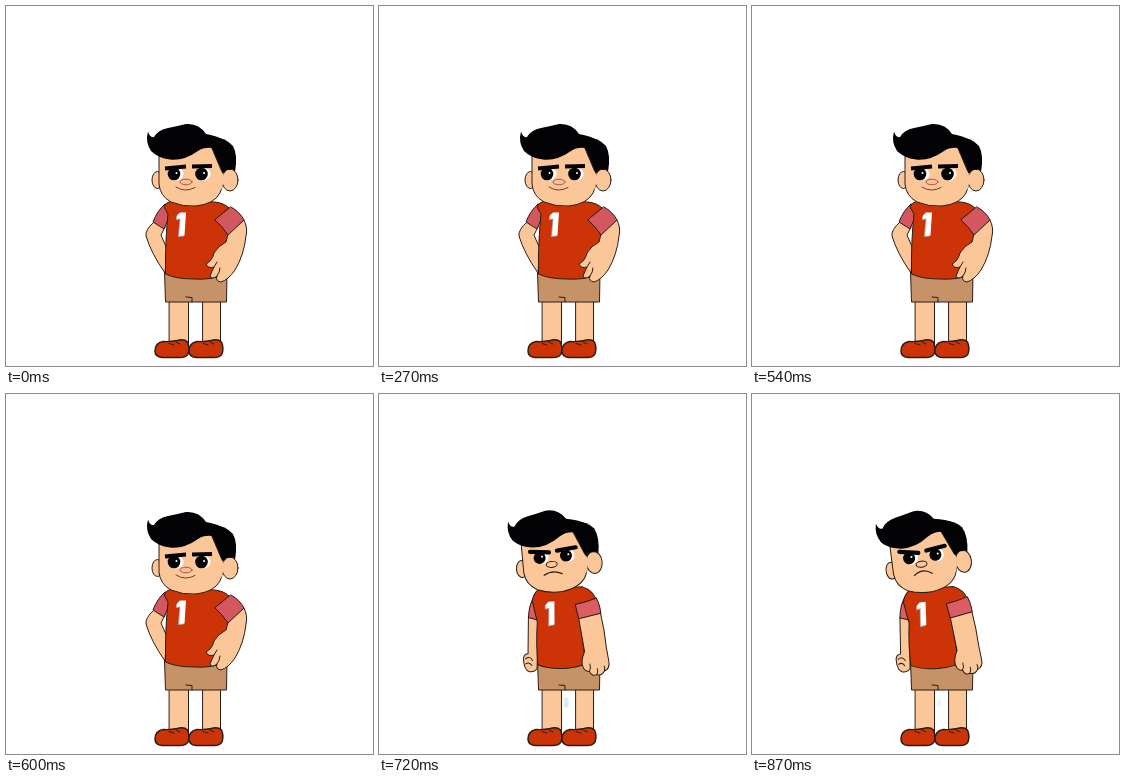
Write an HTML page that moves like this. It is 367 px wide and 360 px high and loops after 900 ms.

```html
<!DOCTYPE html>
<html lang="en">
<head>
<meta charset="utf-8">
<title>Boy turning grumpy</title>
<style>
  @property --p { syntax: "<number>"; inherits: true; initial-value: 0; }
  @property --lift { syntax: "<length>"; inherits: true; initial-value: 0px; }
  html, body { margin: 0; width: 100%; height: 100%; overflow: hidden; background: #fff; }
  svg { display: block; width: 100vw; height: 100vh; animation: lean 900ms step-end infinite; }

  .line { fill: none; }
  g { stroke-linejoin: round; stroke-linecap: round; }
  .ink { stroke: #2a1c17; stroke-width: 1; }
  .skin { fill: #fbc798; }
  .red { fill: #cc3407; }
  .cuff { fill: #d2575f; }
  .cross .cuff { fill: #da5d64; }
  .black { fill: #030305; stroke: none; }
  .white { fill: #fff; stroke: none; }

  .calm { animation: calm 900ms step-end infinite; }
  .cross { visibility: hidden; animation: cross 900ms step-end infinite; }

  .torso { transform-origin: 190px 272px; transform: rotate(calc(var(--p) * -5.7deg)); }
  .arm-l { transform: translateY(calc(var(--p) * -3px)); }
  .arm-r { transform: translateY(calc(var(--p) * -2px)); }
  .head {
    transform-origin: 184px 199px;
    transform: translate(calc(var(--p) * -9px), calc(var(--p) * .7px + var(--lift))) rotate(calc(var(--p) * -7.4deg));
  }
  .frown { transform: translate(calc(var(--p) * 1.5px), calc(2px - var(--p) * 2px)); }
  .brow-l { transform-origin: 170px 158px; transform: rotate(calc(var(--p) * 12deg)); }
  .brow-r { transform-origin: 196px 158px; transform: rotate(calc(var(--p) * -7deg)); }
  .mouth { transform-origin: 181px 181px; transform: scaleY(calc(.05 + var(--p) * .85)); }
  .mouth path { vector-effect: non-scaling-stroke; }
  .glint { transform-origin: 187px 309px; animation: glint 900ms step-end infinite; opacity: 0; }

  @keyframes lean {
    0% { --p: 0; --lift: 0px; }
    73.3% { --p: 0; --lift: -2.5px; }
    76.6% { --p: .42; --lift: -2.5px; }
    79.9% { --p: .71; --lift: -2.5px; }
    83.3% { --p: .84; --lift: -2.5px; }
    86.6% { --p: .91; --lift: -2.5px; }
    89.9% { --p: .95; --lift: -2.5px; }
    93.3% { --p: .98; --lift: -2.5px; }
    96.6%, 100% { --p: 1; --lift: -2.5px; }
  }
  @keyframes calm { 0% { visibility: visible; } 73.3%, 100% { visibility: hidden; } }
  @keyframes cross { 0% { visibility: hidden; } 73.3%, 100% { visibility: visible; } }
  @keyframes glint {
    0% { opacity: 0; }
    73.3% { opacity: 1; transform: none; }
    76.6% { opacity: .8; transform: scale(.65); }
    79.9% { opacity: .8; transform: scale(.45); }
    86.6%, 100% { opacity: .35; transform: scale(.4); }
  }
</style>
</head>
<body>
<svg viewBox="0 0 367 360" preserveAspectRatio="none">
  <defs>
    <path id="shoe" d="M149 345Q149 337 157 335.500Q165 336 171 334.500Q178 332.500 181.500 336Q184 342 182 348Q180 351.500 174 351.500H156Q149 351 149 345Z"/>
    <path id="one" d="M171 209.500L174 206.500H180L178.500 229.500L173 230L174.500 212.500L171 213Z"/>
  </defs>

  <!-- legs -->
  <g class="ink">
    <path class="glint" d="M184 296L191 298Q196 310 191 319Q185 322 181 314Z" fill="#cfe6f6" stroke="none"/>
    <path class="skin" d="M163.500 294H182.500V338H163.500ZM197 294H214.500V338H197Z"/>
    <g class="red" stroke-width="1.5">
      <use href="#shoe"/>
      <use href="#shoe" x="34"/>
      <path class="line" d="M163 337.500L168 339M170 336L174 338M197 337.500L202 339M204 336L208 338" stroke-width="1"/>
    </g>
    <path d="M158.500 266L159.500 296H220.500L221 266Z" fill="#c69268"/>
    <path class="line" d="M186 296V291.500L180 291"/>
  </g>

  <g class="torso ink">
    <!-- left arm -->
    <g class="calm">
      <path class="skin" d="M148 216Q139 224 140 230Q145 247 159 267L161 243L155 229L159 221Z"/>
      <path class="cuff" d="M159 198Q151 205 147 216L158 223L165 207Z"/>
    </g>
    <g class="cross arm-l">
      <path class="skin" d="M153 222L150 259Q145 259 145 265Q145 275 150 277Q156 278 158 274L163 223Z"/>
      <path class="line" d="M147 264Q152 261 154 266M147 269Q151 267 153 271"/>
      <path class="cuff" d="M159 204Q154 212 153 223L162 226L166 207Z"/>
    </g>

    <!-- shirt -->
    <path class="red calm" d="M165 195Q159 197 158 201L162 208Q159 235 159.500 268Q170 273 188 273Q206 274 216 269L224 222L223 202Q218 197 209 196Z"/>
    <path class="red cross" d="M165 193.500Q159 198 158 205L161.500 226Q158.500 248 159 268.500Q170 274 188 274Q200 274 207 271L204 226L222 208Q219 198 209 194Z"/>
    <use href="#one" x="-1" y="1" fill="#bda3a0" stroke="none"/>
    <use href="#one" fill="#fff" stroke="none"/>

    <!-- right arm -->
    <g class="calm">
      <path class="skin" d="M238 214Q242 222 240 230Q238 249 229 264Q222 274 215 276Q209 275 211 270Q206 274 204 270Q206 265 208 261Q202 263 200 258Q206 255 208 247Q212 240 220 236L222 228Z"/>
      <path class="line" d="M211 270Q214 266 214 262M208 261L211 256"/>
      <path class="cuff" d="M225 201Q234 206 238 214L222 229Q216 220 209 214Z"/>
    </g>
    <g class="cross arm-r">
      <path class="skin" d="M203 226L206.500 260Q201 271 204.500 277Q207 281 210 280Q212 286 217 284Q222 286 225 281Q231 279 230 271L228.500 257Q228 240 225 222Z"/>
      <path class="line" d="M210 280Q212 277 211 273M217 284Q219 281 218 278M225 281Q226 278 225 276"/>
      <path class="cuff" d="M200.500 212.500Q212 211 222 207.500Q225 214 225.500 223L203 227Z"/>
    </g>
  </g>

  <g class="head ink">
    <ellipse class="skin" cx="151.500" cy="174" rx="5.500" ry="8.500"/>
    <path class="black" d="M200 132Q218 129.500 227 140Q232 149 229 166L214 174L196 150Z"/>
    <path class="skin" d="M153 148Q153 163 153 178Q154 190 165 196Q177 201 190 200Q208 198 214 187Q218 179 216 166L205 140L170 142Z"/>
    <ellipse class="skin" cx="224" cy="174" rx="8" ry="11"/>
    <path class="skin" d="M213 164L217.500 167Q218 178 215 184L211 180Z" stroke="none"/>
    <path class="black" d="M142 125.500Q144 132 148 131Q152 124 162 122Q172 120 180 118Q193 117 200 128Q212 130 220 135L227 149L225 164Q219 162 216.500 168Q215 153 206 142Q198 141 192 145Q178 155 164 153.500Q152 152 145 145Q139 136 142 125.500Z"/>

    <g class="calm">
      <ellipse class="white" cx="170" cy="168" rx="7.500" ry="6.500"/>
      <ellipse class="white" cx="197.500" cy="168" rx="7" ry="6.500"/>
      <circle class="black" cx="168" cy="168" r="6.300"/>
      <circle class="black" cx="195.500" cy="168" r="6.300"/>
      <circle class="white" cx="170.500" cy="167" r="1"/>
      <circle class="white" cx="198" cy="167" r="1"/>
      <path class="line" d="M159 162.500L180 160.500M186 160.500L206 160" stroke="#030305" stroke-width="4" stroke-linecap="butt"/>
      <ellipse cx="180" cy="176" rx="6" ry="2.800" fill="#fbbd9b" stroke="#a45a44"/>
      <path class="line" d="M170 181Q179 187 189 181.500" stroke="#7a3a28"/>
    </g>

    <g class="cross frown">
      <ellipse class="white" cx="171" cy="164" rx="7" ry="6.500"/>
      <ellipse class="white" cx="197.500" cy="164" rx="6.500" ry="6.500"/>
      <circle class="black" cx="169" cy="164" r="6"/>
      <circle class="black" cx="195.500" cy="164" r="6"/>
      <circle class="white" cx="171.500" cy="163" r="1"/>
      <circle class="white" cx="198" cy="163" r="1"/>
      <g stroke="#030305" stroke-width="4.200" stroke-linecap="butt">
        <path class="line brow-l" d="M160 158.500L179 158"/>
        <path class="line brow-r" d="M187 157.500L206 157.500"/>
      </g>
      <ellipse class="skin" cx="180.500" cy="171.500" rx="5.500" ry="3"/>
      <g class="mouth"><path class="line" d="M172 182Q181 174 190 182" stroke-width="1.200"/></g>
    </g>
  </g>
</svg>
</body>
</html>
```
